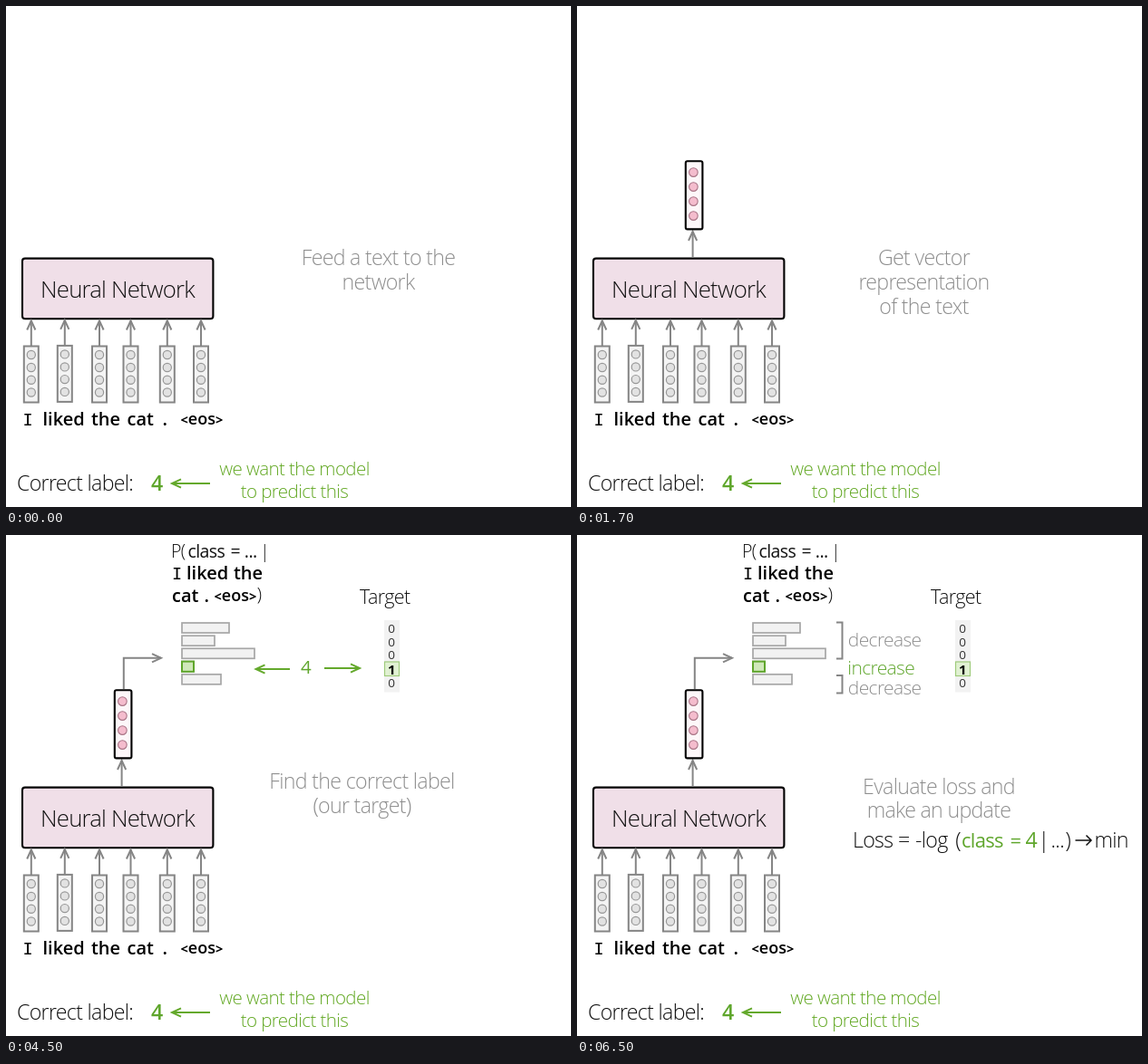
These frames come from a looping animation (623 by 553 pixels, 8000 ms). An HTML page:

```html
<!DOCTYPE html>
<html lang="en">
<head>
<meta charset="utf-8">
<title>Training step of a text classifier</title>
<style>
  html, body { margin: 0; width: 100%; height: 100%; overflow: hidden; background: #fff; }
  svg { display: block; width: 623px; height: 553px; }
  text { font: 350 23.2px "Open Sans", "Noto Sans", sans-serif; letter-spacing: -.03em; fill: #111; white-space: pre; }

  .mid { text-anchor: middle; }
  .note { fill: #8e8e8e; text-anchor: middle; }
  .hint { font-size: 20.6px; fill: #62a823; text-anchor: middle; }
  .side { font-size: 21px; fill: #8e8e8e; }
  .word { font-size: 20px; font-weight: 560; letter-spacing: 0; fill: #000; }
  .tag { font-size: 18px; }
  .angle { font-size: 14.5px; font-weight: 700; }
  .serif { font-family: "DejaVu Sans Mono", monospace; font-weight: 400; font-size: 18.5px; }
  .prob { font-size: 19.5px; }
  .reg { font-weight: 480; }
  .bit { font-size: 13.5px; font-weight: 400; fill: #333; text-anchor: middle; }
  .go { fill: #5fa62c; }

  .line { fill: none; stroke: #858585; stroke-width: 2; }
  .arrow { marker-end: url(#head); }
  .pick { fill: none; stroke: #64a92c; stroke-width: 2; marker-end: url(#pickHead); }
  .bar { fill: #f2f2f2; stroke: #a6a6a6; stroke-width: 1.7; }
  .chosen { fill: #d0e8ba; stroke: #5fa62c; stroke-width: 2; }

  .from1, .from2, .from3, .from4, .at0, .at1, .at2, .at3 { animation: 8s step-end infinite; }
  .from1 { animation-name: from1; }
  .from2 { animation-name: from2; }
  .from3 { animation-name: from3; }
  .from4 { animation-name: from4; }
  .at0 { animation-name: at0; }
  .at1 { animation-name: at1; }
  .at2 { animation-name: at2; }
  .at3 { animation-name: at3; }
  @keyframes from1 { 0% { opacity: 0 } 6.25%, 100% { opacity: 1 } }
  @keyframes from2 { 0% { opacity: 0 } 31.25%, 100% { opacity: 1 } }
  @keyframes from3 { 0% { opacity: 0 } 56.25%, 100% { opacity: 1 } }
  @keyframes from4 { 0% { opacity: 0 } 81.25%, 100% { opacity: 1 } }
  @keyframes at0 { 0% { opacity: 1 } 6.25%, 100% { opacity: 0 } }
  @keyframes at1 { 0% { opacity: 0 } 6.25% { opacity: 1 } 31.25%, 100% { opacity: 0 } }
  @keyframes at2 { 0% { opacity: 0 } 31.25% { opacity: 1 } 56.25%, 100% { opacity: 0 } }
  @keyframes at3 { 0% { opacity: 0 } 56.25% { opacity: 1 } 81.25%, 100% { opacity: 0 } }
</style>
</head>
<body>
<svg viewBox="0 0 623 553">
  <defs>
    <marker id="head" markerUnits="userSpaceOnUse" markerWidth="14" markerHeight="14" refX="11" refY="7" orient="auto">
      <path d="M1 2.4L11 7L1 11.6" fill="none" stroke="#858585" stroke-width="2"/>
    </marker>
    <marker id="pickHead" markerUnits="userSpaceOnUse" markerWidth="14" markerHeight="14" refX="11" refY="7" orient="auto">
      <path d="M1 2.4L11 7L1 11.6" fill="none" stroke="#64a92c" stroke-width="2"/>
    </marker>
    <g id="token">
      <path class="line arrow" d="M0 375V347.5"/>
      <rect x="-8" y="375.5" width="16" height="62" fill="#f4f4f4" stroke="#858585" stroke-width="2"/>
      <g fill="#e2e2e2" stroke="#979797" stroke-width="1.2">
        <circle cy="385" r="4.6"/><circle cy="399" r="4.6"/>
        <circle cy="412.7" r="4.6"/><circle cy="426.5" r="4.6"/>
      </g>
    </g>
  </defs>

  <!-- network and input -->
  <rect x="18" y="278.6" width="210.4" height="66.6" rx="3" fill="#f0dfe8" stroke="#000" stroke-width="2.1"/>
  <text class="mid" x="123" y="322" style="font-size:25.7px">Neural Network</text>
  <use href="#token" x="27.8"/>
  <use href="#token" x="64.8" y="-.6"/>
  <use href="#token" x="103"/>
  <use href="#token" x="137.5"/>
  <use href="#token" x="177.8"/>
  <use href="#token" x="215"/>
  <text class="word" y="463"><tspan class="serif" x="18.5">I</tspan><tspan x="40.5">liked</tspan><tspan x="94">the</tspan><tspan x="133.5">cat</tspan><tspan x="172.5">.</tspan></text>
  <text class="word tag" x="192.5" y="462"><tspan class="angle">&lt;</tspan>eos<tspan class="angle">&gt;</tspan></text>

  <text x="12" y="535" style="font-size:23.2px">Correct label:</text>
  <text class="go" x="160" y="535" style="font-weight:600">4</text>
  <path class="pick" d="M225 527H183"/>
  <text class="hint" x="318" y="518">we want the model</text>
  <text class="hint" x="318" y="542.5">to predict this</text>

  <!-- text vector -->
  <g class="from1">
    <path class="line arrow" d="M127.6 277V249"/>
    <rect x="119.8" y="171.2" width="18.6" height="75.2" rx="2" fill="#fdf7f9" stroke="#000" stroke-width="2.1"/>
    <g fill="#f4bccd" stroke="#a87486" stroke-width="1.1">
      <circle cx="128.4" cy="183.6" r="4.8"/><circle cx="128.4" cy="199.6" r="4.8"/>
      <circle cx="128.4" cy="215.6" r="4.8"/><circle cx="128.4" cy="231.6" r="4.8"/>
    </g>
  </g>

  <!-- class probabilities -->
  <g class="from2">
    <path class="line arrow" d="M129.8 170V135.8H171"/>
    <text class="prob" y="25"><tspan x="182">P(</tspan><tspan class="reg" x="200.5">class</tspan><tspan class="reg" x="247.5">=</tspan><tspan class="reg" x="262.8">...</tspan><tspan x="280">|</tspan></text>
    <text class="word" y="49"><tspan class="serif" x="183">I</tspan><tspan x="199">liked</tspan><tspan x="251">the</tspan></text>
    <text class="word" y="73.5"><tspan x="183">cat</tspan><tspan x="218.5">.</tspan></text>
    <text class="word tag" x="229.5" y="73"><tspan class="angle">&lt;</tspan>eos<tspan class="angle">&gt;</tspan></text>
    <text class="prob" x="276.8" y="73">)</text>
    <g class="bar">
      <rect x="194" y="97" width="52" height="11"/>
      <rect x="194" y="111.2" width="36" height="11"/>
      <rect x="194" y="125.3" width="80" height="11"/>
      <rect x="194" y="139.6" width="13" height="11"/>
      <rect x="194" y="153.8" width="43" height="11"/>
    </g>
  </g>

  <!-- target column -->
  <g class="from3">
    <rect class="chosen" x="194" y="139.6" width="13" height="11.2"/>
    <text x="390" y="75.8" style="font-size:21.5px">Target</text>
    <rect x="417" y="94" width="17" height="79.5" fill="#f2f2f2"/>
    <rect x="417.5" y="140" width="16" height="15.5" fill="#e1f1d3" stroke="#9fcb7c" stroke-width="1.2"/>
    <text class="bit" x="425" y="108">0</text>
    <text class="bit" x="425" y="123">0</text>
    <text class="bit" x="425" y="137.3">0</text>
    <text class="bit" x="425" y="153.5" style="font-size:15px;font-weight:700;fill:#000">1</text>
    <text class="bit" x="425" y="168">0</text>
  </g>
  <g class="at3">
    <path class="pick" d="M313 148H275.5"/>
    <path class="pick" d="M351 147H390"/>
    <text class="mid go" x="330.5" y="153" style="font-size:20.5px;font-weight:450">4</text>
  </g>

  <!-- loss -->
  <g class="from4">
    <path class="line" d="M286 96.5H292.5V136.5H286M286 155H292.5V174.5H286"/>
    <text class="side" x="298.8" y="123.3">decrease</text>
    <text class="side go" x="298.3" y="154">increase</text>
    <text class="side" x="298.8" y="176">decrease</text>
    <text class="note" x="399" y="286">Evaluate loss and</text>
    <text class="note" x="399" y="312">make an update</text>
    <text y="345"><tspan x="304">Loss</tspan><tspan x="354">=</tspan><tspan x="373">-log</tspan><tspan x="417.3">(</tspan><tspan class="go reg" x="424" style="font-size:22px">class</tspan><tspan class="go reg" x="477.5" style="font-size:22px">=</tspan><tspan class="go reg" x="494.5">4</tspan><tspan x="508.5">|</tspan><tspan x="522.5">...</tspan><tspan x="538.5">)</tspan><tspan x="570.5">min</tspan></text>
    <path d="M549.5 337H567M561.5 331.5L567 337L561.5 342.5" fill="none" stroke="#111" stroke-width="1.5"/>
  </g>

  <!-- captions -->
  <g class="at0">
    <text class="note" x="410.5" y="286">Feed a text to the</text>
    <text class="note" x="410.5" y="312.5">network</text>
  </g>
  <g class="at1">
    <text class="note" x="382.5" y="286">Get vector</text>
    <text class="note" x="382.5" y="313">representation</text>
    <text class="note" x="382.5" y="340">of the text</text>
  </g>
  <g class="at2">
    <text class="note" x="393" y="280.3">Get probability</text>
    <text class="note" x="393" y="307">distribution</text>
  </g>
  <g class="at3">
    <text class="note" x="392.5" y="280.3">Find the correct label</text>
    <text class="note" x="392.5" y="307">(our target)</text>
  </g>
</svg>
</body>
</html>
```
